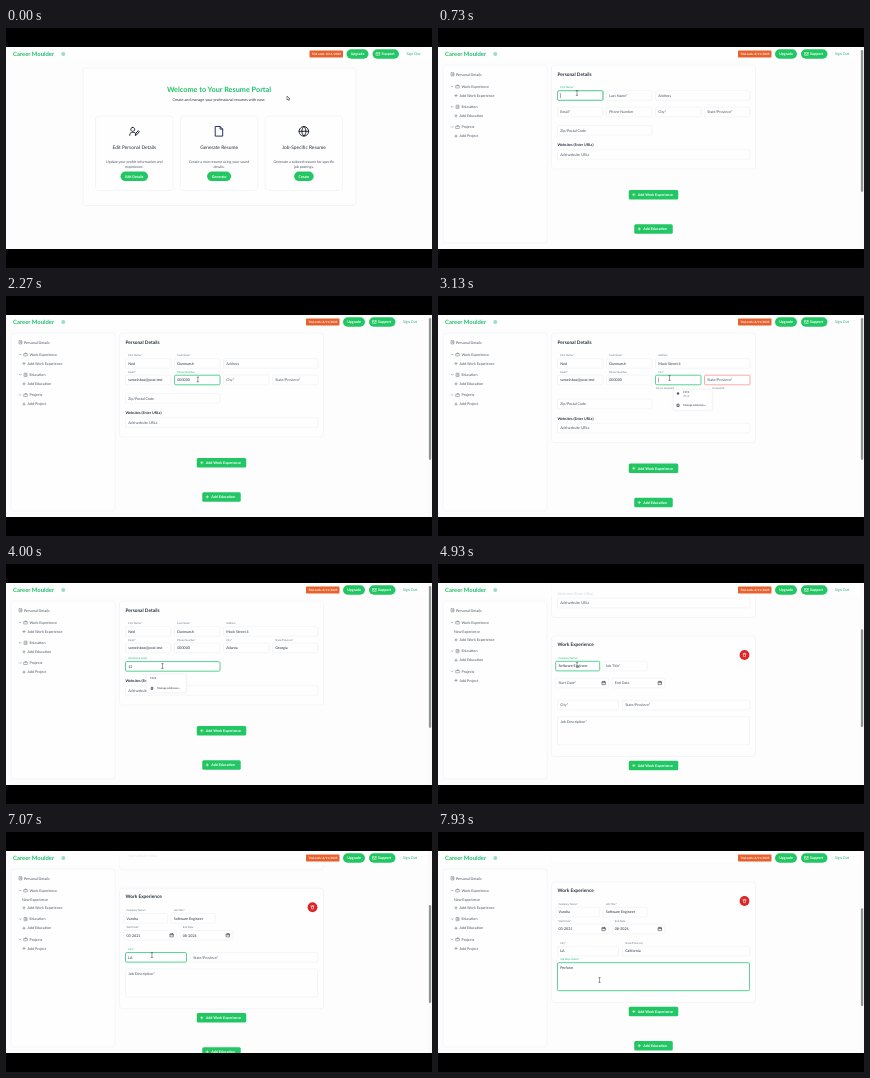
These frames come from a looping animation (426x240 px, 8000 ms). An HTML page:

```html
<!DOCTYPE html>
<html lang="en">
<head>
<meta charset="utf-8">
<title>Resume form walkthrough</title>
<style>
  html, body { margin: 0; width: 100%; height: 100%; overflow: hidden; background: #000; }
  svg { display: block; width: 100vw; height: 100vh; }
  text { font-family: Lato, "Open Sans", sans-serif; white-space: pre; text-rendering: geometricPrecision; }
  .panel { fill: #fefefe; stroke: #eaecf1; stroke-width: .5; }
  .popup { fill: #fff; stroke: #eceef2; stroke-width: .4; filter: drop-shadow(0 .6px 1px #00000014); }
  .icon { fill: none; stroke-linecap: round; stroke-linejoin: round; }
</style>
</head>
<body>
<svg id="stage" viewBox="0 0 426 240" preserveAspectRatio="none">
  <defs>
    <linearGradient id="green"><stop stop-color="#22c55e"/><stop offset="1" stop-color="#22c768"/></linearGradient>
    <linearGradient id="title"><stop stop-color="#22c55e"/><stop offset="1" stop-color="#1cbb78"/></linearGradient>
    <clipPath id="page"><rect y="19" width="426" height="202"/></clipPath>
  </defs>
  <g id="view" clip-path="url(#page)"></g>
</svg>
<script>
const LOOP = 8000, FPS = 15;
const INK = '#4b5563', DARK = '#27313f', MUTED = '#6b7280', TEAL = '#20b27c', RED = '#ef4444';
const FORM_OPEN = 500, JOB_ADDED = 4430, ERRORS = [2900, 3500], ERROR_HEIGHT = 5.6;

const SCROLL = [[4500, 0], [4730, 87.5], [6950, 87.5], [7130, 109.5]];
const POINTER = [
  [0, 282, 70], [100, 282, 70], [330, 129, 148], [520, 129, 148], [720, 139, 65], [1450, 139, 64],
  [1850, 150, 84], [2000, 190, 84], [2250, 190, 84], [2400, 245, 68], [2750, 245, 68], [2900, 231.5, 82],
  [3250, 231.5, 82], [3450, 285, 84], [3700, 285, 84], [3850, 156.5, 102], [4150, 156.5, 102],
  [4350, 216, 167], [4700, 216, 167], [4830, 139, 101], [5450, 139, 101], [5600, 188, 102],
  [5900, 188, 102], [6050, 150, 122], [6250, 150, 122], [6450, 158, 147], [6600, 196, 119],
  [6750, 200, 165], [6900, 150, 141], [7130, 145, 119], [7250, 205, 119], [7450, 205, 119], [7600, 161.5, 148]
];

// Eased interpolation over [time, value, ...] rows
function track(rows, t) {
  if (t <= rows[0][0]) return rows[0].slice(1);
  for (let i = 1; i < rows.length; i++) {
    const [a, b] = [rows[i - 1], rows[i]];
    if (t < b[0]) {
      const k = (t - a[0]) / (b[0] - a[0]), e = k * k * (3 - 2 * k);
      return a.slice(1).map((v, j) => v + (b[j + 1] - v) * e);
    }
  }
  return rows[rows.length - 1].slice(1);
}
const within = (t, [from, to]) => t >= from && t < to;
const typed = (s, t, from, to) => s.slice(0, Math.max(0, Math.ceil((t - from) / (to - from) * s.length)));
const errorShift = t => within(t, ERRORS) ? ERROR_HEIGHT : 0;

const text = (x, y, s, size = 3.65, fill = INK, weight = 400, anchor = 'start') =>
  `<text x="${x}" y="${y + size * .35}" font-size="${size}" fill="${fill}" font-weight="${weight}" text-anchor="${anchor}">${s}</text>`;
const middle = (x, y, s, size, fill, weight) => text(x, y, s, size, fill, weight, 'middle');
const rect = (x, y, w, h, r, attrs) => `<rect x="${x}" y="${y}" width="${w}" height="${h}" rx="${r}" ${attrs}/>`;
const panel = (x, y, w, h) => rect(x, y, w, h, 3, 'class="panel"');
const popup = (x, y, w, h) => rect(x, y, w, h, 1.2, 'class="popup"');
const icon = (x, y, d, stroke = MUTED, width = .5) =>
  `<path class="icon" transform="translate(${x} ${y})" d="${d}" stroke="${stroke}" stroke-width="${width}"/>`;
const PLUS = 'M-1.2 0H1.2M0-1.2V1.2', DOWN = 'M-.9-.4L0 .5L.9-.4';
const DOC = 'M-1.3-1.6H1.3V1.6H-1.3ZM-.6-.5H.6M-.6.4H.6';
const BAG = 'M-1.6-.8H1.6V1.5H-1.6ZM-.6-.8V-1.5H.6V-.8';
const CALENDAR = 'M-1.5-1.3H1.5V1.6H-1.5ZM-1.5-.4H1.5M-.7-1.8V-1M.7-1.8V-1';

function button(cx, cy, w, label, round, size = 3.6) {
  return rect(cx - w / 2, cy - 4.75, w, 9.5, round, 'fill="url(#green)"') + middle(cx, cy, label, size, '#fff', 700);
}
function addButton(cx, cy, w, label) {
  return rect(cx - w / 2, cy - 4.75, w, 9.5, 1.5, 'fill="url(#green)"') +
    icon(cx - w / 2 + 5, cy, PLUS, '#fff', .6) + text(cx - w / 2 + 9, cy, label, 3.65, '#fff', 700);
}

function header(shift) {
  const x = v => v + shift;
  return rect(0, 19, 426, 14, 0, 'fill="#fefefe" fill-opacity=".85"') +
    text(7, 26, 'Career Moulder', 5.9, 'url(#title)', 700) +
    `<circle cx="57.3" cy="26" r=".9" fill="none" stroke="${TEAL}" stroke-width=".5"/>` +
    icon(57.3, 26, 'M-1.7 0H-1.6M1.6 0H1.7M0-1.7V-1.6M0 1.6V1.7M-1.2-1.2H-1.15M1.2 1.2H1.15M1.2-1.2H1.15M-1.2 1.2H-1.15', TEAL) +
    rect(x(300), 22.5, 33.5, 7, 1, 'fill="#e8612c"') + middle(x(316.8), 26, 'Trial ends: 8/11/2025', 3, '#fff', 700) +
    button(x(348), 26, 22, 'Upgrade', 4.75) +
    rect(x(363), 21.25, 26.5, 9.5, 4.75, 'fill="url(#green)"') +
    icon(x(368.5), 26, 'M-1.7-1.3H1.7V1.3H-1.7ZM-1.7-1.1L0 .2L1.7-1.1', '#fff') + text(x(372), 26, 'Support', 3.7, '#fff', 700) +
    text(x(397), 26, 'Sign Out', 3.7, TEAL);
}

function dashboard() {
  const cards = [
    ['Edit Personal Details', 'Update your profile information and', 'experience.', 'Edit Details', 27.5,
      'M-4.5 4V3C-4.5.5 1 .5 1.5 2M-1.5-4A2 2 0 1 1-1.6-4M1 3.8L1.5 2L4-.6L5 .4L2.6 3.2Z'],
    ['Generate Resume', 'Create a new resume using your saved', 'details.', 'Generate', 24,
      'M-3.5-4.8H1L3.6-2.2V4.8H-3.5ZM1-4.8V-2.2H3.6'],
    ['Job-Specific Resume', 'Generate a tailored resume for specific', 'job postings.', 'Create', 19.5,
      'M0-4.8A4.8 4.8 0 1 1-.1-4.8M-4.8 0H4.8M0-4.8C-2.8-2-2.8 2 0 4.8C2.8 2 2.8-2 0-4.8']
  ];
  return panel(77, 40, 273, 137.5) +
    middle(213, 61.5, 'Welcome to Your Resume Portal', 7.3, 'url(#title)', 700) +
    middle(213, 72, 'Create and manage your professional resumes with ease.', 3.75, DARK) +
    cards.map(([name, a, b, action, w, d], i) => {
      const cx = 128.3 + i * 84.8;
      return panel(cx - 38.7, 88, 77.4, 74.5) + icon(cx, 103.3, d, i === 1 ? '#1e2a5a' : '#111827', .95) +
        middle(cx, 119.5, name, 4.85, DARK) + middle(cx, 133.3, a, 3.6, INK) + middle(cx, 138.7, b, 3.6, INK) +
        button(cx, 148.3, w, action, 4.75);
    }).join('');
}

function sidebar(added) {
  const d = added ? 8.3 : 0;
  const section = (y, name, add, extra = 0) =>
    icon(14.2, y, DOWN) + icon(19.7, y, name === 'Education' ? DOC : BAG) + text(23.5, y, name) +
    icon(18, y + 9.1 + extra, PLUS, INK, .45) + text(21.6, y + 9.1 + extra, add);
  return panel(5, 37, 104, 178) + icon(14.7, 46.3, DOC) + text(18, 46.3, 'Personal Details') +
    section(58.5, 'Work Experience', 'Add Work Experience', d) +
    (added ? text(16, 67.5, 'New Experience') : '') +
    section(78.8 + d, 'Education', 'Add Education') + section(99 + d, 'Projects', 'Add Project');
}

function field(t, { x, y, w, h = 9.6, name, value = '', focus = [0, 0], error, pad = 2.7 }) {
  const active = within(t, focus), raised = active || value;
  const edge = error ? RED : active ? '#22c573' : '#e9ebf0';
  const line = y + 4.9;
  let out = rect(x, y, w, h, 1.2, `fill="#fefefe" stroke="${edge}" stroke-width="${active ? .75 : .45}"`);
  out += raised ? text(x + pad, y - 3.4, name, 2.65, active ? TEAL : MUTED) : text(x + pad, line, name, 3.65, INK);
  if (value) out += text(x + pad, line, value, 3.65, DARK);
  if (active && !value) out += icon(x + pad + .3, line, 'M0-2V2', DARK, .4);
  return out;
}

function personal(t) {
  const zipFocus = [3850, 4200], cityFocus = [2900, 3400], shift = errorShift(t), invalid = shift > 0;
  const fields = [
    { x: 119.5, y: 62.7, w: 45.5, name: 'First Name*', value: typed('Ned', t, 780, 960), focus: [720, 1000] },
    { x: 168.5, y: 62.7, w: 45.5, name: 'Last Name*', value: typed('Dunmarsh', t, 1060, 1300), focus: [1000, 1340] },
    { x: 217.5, y: 62.7, w: 94.5, name: 'Address', value: typed('Mock Street 4', t, 2430, 2780), focus: [2370, 2900] },
    { x: 119.5, y: 79.2, w: 45.5, name: 'Email*', value: typed('someinbox@post.test', t, 1430, 1900), focus: [1340, 1980] },
    { x: 168.5, y: 79.2, w: 45.5, name: 'Phone Number', value: typed('000000', t, 2050, 2280), focus: [1980, 2370] },
    { x: 217.5, y: 79.2, w: 45.5, name: 'City*', value: typed('Atlanta', t, 3200, 3380), focus: cityFocus },
    { x: 266.5, y: 79.2, w: 45.5, name: 'State/Province*', value: typed('Georgia', t, 3520, 3740), focus: [3400, 3850], error: invalid },
    { x: 119.5, y: 97.6 + shift, w: 94.5, name: 'Zip/Postal Code', value: typed('12345', t, 3950, 4180), focus: zipFocus },
    { x: 119.5, y: 121.7 + shift, w: 192.5, name: 'Add website URLs' }
  ];
  let out = panel(113.5, 37, 204, 104 + shift) + text(119.5, 46, 'Personal Details', 4.75, DARK, 700) +
    text(119.5, 117.2 + shift, 'Websites (Enter URLs)', 3.65, DARK, 700) + fields.map(f => field(t, f)).join('');
  if (within(t, [700, 1700])) out += rect(119.5, 62.7, 45.5, 9.6, 1.2, 'fill="none" stroke="#79cba3" stroke-width=".6"');
  if (invalid) out += text(218, 92, 'City is required', 2.7, MUTED) + text(274, 92, 'is required', 2.7, MUTED);
  if (within(t, cityFocus))
    out += popup(235.5, 93.5, 38.5, 20.5) + `<circle cx="240" cy="97.5" r="1.2" fill="${INK}"/>` +
      text(245, 96, '1994', 2.7, DARK) + text(245, 100, '(75.2)', 2.5, MUTED) +
      icon(240, 109, 'M-1 1.2V-.8H1V1.2Z', INK, .9) + text(245, 109, 'Manage addresses...', 2.7, DARK);
  if (within(t, zipFocus))
    out += popup(140.5, 110.3, 39.5, 18.5) + text(144, 114, '1994', 2.7, DARK) +
      icon(146, 124, 'M-.8 1V-.7H.8V1Z', INK, .9) + text(151, 124, 'Manage addresses...', 2.7, DARK);
  return out;
}

function monthPicker(x, y) {
  const months = 'Jan Feb Mar Apr May Jun Jul Aug Sep Oct Nov Dec'.split(' ');
  return popup(x, y, 47, 58) + middle(x + 24, y + 7, '2025', 3.3, DARK, 700) +
    icon(x + 6.5, y + 7, 'M.4-.9L-.5 0L.4.9') + icon(x + 41.5, y + 7, 'M-.4-.9L.5 0L-.4.9') +
    icon(x + 4, y + 13.5, 'M0 0H39', '#eceef2', .4) +
    months.map((m, i) => middle(x + 9 + i % 3 * 14.8, y + 21.7 + Math.floor(i / 3) * 9, m, 3.5, INK)).join('');
}

function job(t) {
  const top = 87.5, startFocus = [6050, 6480], endFocus = [6560, 6820];
  const company = t < 5220 ? (t > 4860 ? 'Software Engineer' : '') : typed('Vundra', t, 5260, 5480);
  const fields = [
    { x: 117.7, y: 97.3, w: 44, name: 'Company Name*', value: company, focus: [4800, 5560] },
    { x: 165, y: 97.3, w: 44, name: 'Job Title*', value: typed('Software Engineer', t, 5620, 5950), focus: [5560, 6050] },
    { x: 117.7, y: 114.2, w: 53, name: 'Start Date*', value: t >= startFocus[1] ? '03-2021' : '' },
    { x: 174, y: 114.2, w: 53, name: 'End Date', value: t >= endFocus[1] ? '08-2024' : '', focus: endFocus },
    { x: 119.5, y: 136.3, w: 61, name: 'City*', value: typed('LA', t, 6980, 7080), focus: [6900, 7200] },
    { x: 184.5, y: 136.3, w: 127.5, name: 'State/Province*', value: typed('California', t, 7240, 7480), focus: [7200, 7560] },
    { x: 119.5, y: 152.7, w: 192, h: 28, name: 'Job Description*', value: typed('Perform', t, 7700, 7935), focus: [7560, LOOP] }
  ];
  let out = panel(113.5, 72, 204, 120.5) + text(119.5, 79.9, 'Work Experience', 4.75, DARK, 700) +
    '<circle cx="306.5" cy="91" r="4.9" fill="#dc2626"/>' +
    icon(306.5, 91, 'M-1.5-1.1H1.5M-1.1-1.1L-.9 1.7H.9L1.1-1.1M-.5-1.1V-1.7H.5V-1.1', '#fff', .5) +
    fields.map(f => field(t, f)).join('') + icon(165.8, 119, CALENDAR, DARK) + icon(222, 119, CALENDAR, DARK);
  if (within(t, startFocus))
    out += rect(117.7, 114.2, 44, 9.6, 1.2, `fill="#fefefe" stroke="${RED}" stroke-width=".6"`) +
      text(120.4, 115.8, 'Start Date*', 3.3, RED) + icon(120.8, 120.8, 'M0-1.7V1.7', DARK, .4) + monthPicker(120, 125);
  if (within(t, endFocus)) out += monthPicker(176, 125);
  return `<g transform="translate(0 ${top})">${out}</g>`;
}

function form(t) {
  const added = t >= JOB_ADDED, [scroll] = track(SCROLL, t);
  const buttonY = (added ? 289 : 166.7) + errorShift(t);
  const thumb = added ? [21.5 + scroll / 2, 98] : [22, 142];
  return `<g transform="translate(0 ${-scroll})">` + personal(t) +
    addButton(215.5, buttonY, 49.5, 'Add Work Experience') + addButton(215.5, buttonY + 34.2, 38.5, 'Add Education') +
    (added ? job(t) : '') + '</g>' + sidebar(added) + header(0) +
    rect(422, 19, 4, 202, 0, 'fill="#fafafa"') + rect(422.9, thumb[0], 2.3, thumb[1], 1.15, 'fill="#939496"');
}

function pointer(t) {
  const [x, y] = track(POINTER, t);
  const arrow = t < 680 || within(t, [4250, 4770]) || within(t, [6300, 6560]);
  return arrow
    ? `<path transform="translate(${x - 1} ${y - 2})" d="M0 0V4L1 3.1L1.7 4.5L2.3 4.2L1.7 2.9H2.9Z" fill="#fff" stroke="#222" stroke-width=".5"/>`
    : icon(x, y, 'M-.8-2.3H.8M0-2.3V2.3M-.8 2.3H.8', '#333', .45);
}

const view = document.getElementById('view'), began = performance.now();
let shown = -1;
function tick() {
  const step = Math.floor(((performance.now() - began) % LOOP) * FPS / 1000 + .06);
  if (step !== shown) {
    shown = step;
    const t = step * 1000 / FPS;
    view.innerHTML = rect(0, 19, 426, 202, 0, 'fill="#fdfdfe"') +
      (t < FORM_OPEN ? dashboard() + header(3.5) : form(t)) + pointer(t);
  }
  requestAnimationFrame(tick);
}
tick();
</script>
</body>
</html>
```
